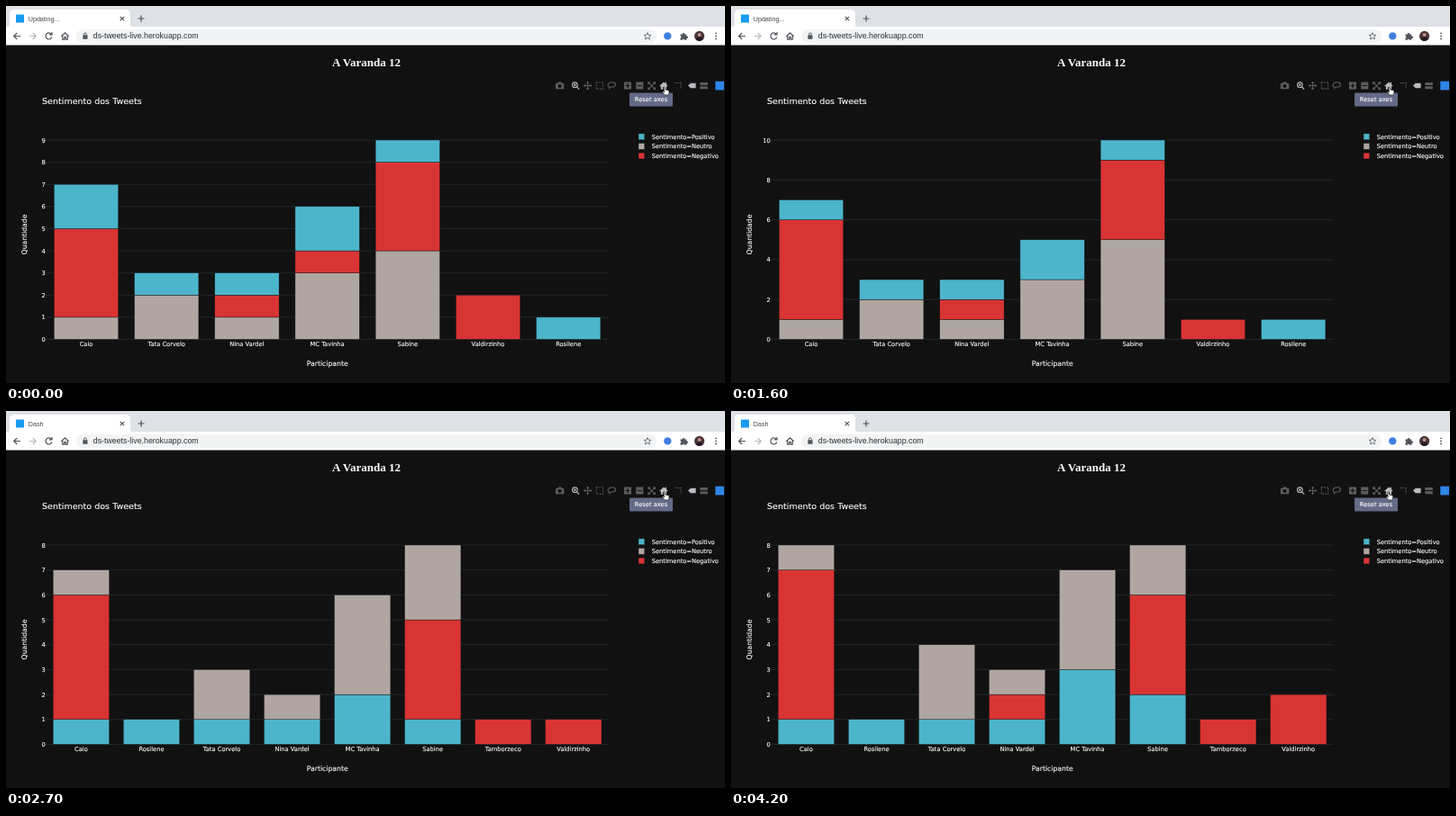
An HTML page that plays this animation: 798x419 px, repeating every 4.4 s.

```html
<!DOCTYPE html>
<html lang="pt">
<head>
<meta charset="utf-8">
<title>Dash</title>
<style>
  html, body { margin: 0; width: 100%; height: 100%; overflow: hidden; background: #111; }
  svg { display: block; width: 100%; height: 100%; }
  .ui { font-family: "Liberation Sans", Arial, sans-serif; }
  .plot { font-family: "DejaVu Sans", Verdana, sans-serif; font-size: 6.7px; fill: #fff; }
  .plot text { stroke: #fff; stroke-width: .12; }
  .head { font: bold 13px "Liberation Serif", Times, serif; fill: #fff; }
  .mid { text-anchor: middle; }
  .end { text-anchor: end; }
  .line { fill: none; stroke: #50545a; stroke-width: 1.2; }
  .tool { fill: #5c5d5f; stroke: #5c5d5f; stroke-width: 0; }
  .tool .o { fill: none; stroke-width: 1.1; }
  .tool .on { fill: #b9bbbf; stroke: #b9bbbf; }
</style>
</head>
<body>
<svg viewBox="0 0 798 419" preserveAspectRatio="none">
  <clipPath id="area"><rect x="44.4" y="137.8" width="624.4" height="233"/></clipPath>
  <rect width="798" height="419" fill="#111"/>

  <g class="ui">
    <rect width="798" height="24" fill="#dee1e6"/>
    <rect y="23" width="798" height="20.5" fill="#fff"/>
    <path d="M0 24q4 0 4-4V9q0-5 5-5h124q5 0 5 5v11q0 4 4 4z" fill="#fff"/>
    <rect x="11" y="9.5" width="9" height="9" fill="#1a9bf0"/>
    <text id="tab" x="24.7" y="16.5" font-size="7.2" fill="#45494d"></text>
    <path class="line" d="M126.7 11.8l4.4 4.4m0-4.4l-4.4 4.4M146.5 14h7m-3.5-3.5v7"/>
    <rect x="78" y="26" width="644" height="15" rx="7.5" fill="#f1f3f4"/>
    <path class="line" d="M16 33.5H8.7m3.5-3.5l-3.5 3.5 3.5 3.5"/>
    <path class="line" style="stroke:#b9bcc0" d="M26 33.5h7.3m-3.5-3.5l3.5 3.5-3.5 3.5"/>
    <path class="line" d="M50.3 31.3a3.5 3.5 0 1 0 .6 3.2M51 29v2.9h-3"/>
    <path class="line" d="M61.3 33.7l4.2-3.9 4.2 3.9M62.7 33v4.2h2v-2.7h1.6v2.7h2V33"/>
    <rect x="85.3" y="32.3" width="5.2" height="4.4" rx=".5" fill="#50545a"/>
    <path class="line" style="stroke-width:.9" d="M86.5 32.5v-1.2a1.4 1.4 0 0 1 2.8 0v1.2"/>
    <text x="96.8" y="36.3" font-size="8.8" fill="#2a2d31">ds-tweets-live.herokuapp.com</text>
    <path class="line" style="stroke-width:.8" d="M712 29.6l1.1 2.5 2.7.3-2 1.8.6 2.7-2.4-1.4-2.4 1.4.6-2.7-2-1.8 2.7-.3z"/>
    <circle cx="734.3" cy="33.4" r="4.2" fill="#3f7fe0"/>
    <path d="M748.5 31.4h2.2a1.3 1.3 0 1 1 2.6 0h2v2.2a1.3 1.3 0 1 1 0 2.5v1.6h-2.2a1.2 1.2 0 0 0-2.3 0h-2.3v-2.2a1.2 1.2 0 0 0 0-2.3z" fill="#50545a"/>
    <circle cx="769.6" cy="33.4" r="5.6" fill="#4a3538"/>
    <circle cx="769.6" cy="31.9" r="2" fill="#bd9188"/>
    <path d="M765.7 37.3q.6-3 3.9-3t3.9 3a5.6 5.6 0 0 1-7.8 0z" fill="#241c22"/>
    <g fill="#50545a"><circle cx="788" cy="30.3" r=".9"/><circle cx="788" cy="33.4" r=".9"/><circle cx="788" cy="36.5" r=".9"/></g>
  </g>

  <text class="head mid" x="400" y="67">A Varanda 12</text>

  <g class="tool">
    <path fill-rule="evenodd" d="M610 86h2l1-1.5h3.4l1 1.5h1.9v6.2H610zM614.6 86.9a2.1 2.1 0 1 0 .01 0z"/>
    <g class="on"><circle class="o" cx="631.4" cy="87.7" r="2.8"/><path class="o" d="M633.5 89.8l2.7 2.7M630 87.7h2.8m-1.4-1.4v2.8"/></g>
    <path class="o" d="M641.5 88.5h8.2m-4.1-4.1v8.2"/>
    <path d="M645.6 83.7l1.9 2h-3.8zM645.6 93.3l1.9-2h-3.8zM640.8 88.5l2-1.9v3.8zM650.4 88.5l-2-1.9v3.8z"/>
    <rect class="o" x="655.3" y="84.7" width="7.4" height="7.4" stroke-dasharray="1.6 1.2"/>
    <path class="o" d="M670 90.6c-4-2.2-1-5.9 2.8-5.9 5 0 4.8 5.3 0 5.3-3.6 0-3 1.5-2.8 2.7"/>
    <path fill-rule="evenodd" d="M686 84.5h8v8h-8zM689.4 86v1.9h-1.9v1.2h1.9V91h1.2v-1.9h1.9v-1.2h-1.9V86z"/>
    <path fill-rule="evenodd" d="M699.3 84.5h8v8h-8zM700.8 87.9v1.2h5v-1.2z"/>
    <path class="o" d="M713.4 85.4l6.4 6.4m0-6.4l-6.4 6.4M712.8 87v-2.2h2.2m3.2 0h2.2V87m0 3.2v2.2h-2.2m-3.2 0h-2.2v-2.2"/>
    <path class="on" d="M725.3 88.8l4.7-4.4 1.8 1.7v-1.3h1.2v2.4l1.7 1.6-.7.7-.9-.8v4h-2.2v-2.6h-1.8v2.6h-2.2v-4l-.9.8z"/>
    <path class="o" d="M742.8 85.5h6.3v6.8" stroke-dasharray="1.5 1"/>
    <path class="on" d="M757 88.5l2.8-2.7h5.8v5.4h-5.8z"/>
    <path d="M770.3 85h8.5v3h-8.5zM770.3 89.3h8.5v3h-8.5z"/>
    <rect x="787.3" y="83.7" width="9.7" height="9.7" fill="#2f86e8"/>
  </g>

  <g class="plot">
    <text x="40" y="109.3" font-size="9.55">Sentimento dos Tweets</text>
    <text class="mid" x="356.7" y="399.5" font-size="7.7">Participante</text>
    <text class="mid" transform="translate(23.3 254) rotate(-90)" font-size="7.7">Quantidade</text>
    <g id="legend"></g>
    <g id="axes"></g>
    <g id="bars" clip-path="url(#area)"></g>
    <rect x="692" y="96.5" width="48" height="15" rx="1" fill="#636b87"/>
    <text class="mid" x="716" y="106.3" font-size="6.7">Reset axes</text>
  </g>

  <path id="hand" d="M-1.5 .2q1.3-.8 1.5.6l.4 2.2 3.2.7q1.3.4 1.1 1.7l-.6 3.5h-4.2l-2.6-3.3q0-1 1.2-.5l.8.7z" fill="#fff" stroke="#111" stroke-width=".6"/>
</svg>

<script>
const LOOP = 4400, STEP = 100, MORPH = 300;
const LEFT = 44.4, WIDTH = 624.4, BASE = 370.5, HEIGHT = 221.5;
const NAMES = {
  C: 'Caio', R: 'Rosilene', T: 'Tata Corvelo', N: 'Nina Vardel',
  M: 'MC Tavinha', S: 'Sabine', B: 'Tamborzeco', V: 'Valdirzinho'
};
// order of the bars inside each series
const ORDER = 'CBVRTNMS';
const SERIES = [
  ['Positivo', '#4cb5cb'],
  ['Neutro', '#b0a6a1'],
  ['Negativo', '#d93434']
];

// values: positive, neutral and negative count of each participant
const state = (start, morph, max, stack, cats, values) => ({
  start, morph, max, stack, cats,
  values: values.split(' ').map(v => [...v].map(Number))
});
const STATES = [
  state(0, 0, 9, [1, 2, 0], 'CTNMSVR', '214 120 111 231 144 002 100'),
  state(150, MORPH, 10, [1, 2, 0], 'CTNMSVR', '215 120 111 231 154 001 100'),
  state(1300, MORPH, 10, [1, 2, 0], 'CTNMSVR', '115 120 111 230 154 001 100'),
  state(2200, 0, 10, [2, 1, 0], 'CVSTNMR', '115 001 154 120 110 240 100'),
  state(2350, MORPH, 8, [0, 2, 1], 'CRTNMSBV', '115 100 120 110 240 134 001 001'),
  state(2950, MORPH, 8, [0, 2, 1], 'CRTNMSBV', '114 100 120 110 240 134 001 002'),
  state(3550, MORPH, 8, [0, 2, 1], 'CRTNMSBV', '114 100 130 111 240 134 001 002'),
  state(3850, MORPH, 8, [0, 2, 1], 'CRTNMSBV', '116 100 130 111 340 224 001 002')
];

const $ = id => document.getElementById(id);
const mix = (a, b, p) => a + (b - a) * p;
const ease = p => p < .5 ? 4 * p ** 3 : 1 - 4 * (1 - p) ** 3;
const rect = (x, y, w, h, fill) =>
  `<rect x="${x}" y="${y}" width="${w}" height="${h}" fill="${fill}" stroke="#111" stroke-width=".4"/>`;
const text = (x, y, cls, str) => `<text x="${x}" y="${y}" class="${cls}">${str}</text>`;

$('legend').innerHTML = SERIES.map(([name, color], i) => {
  const y = 145.3 + i * 10.6;
  return rect(702, y - 3.4, 6.8, 6.8, color) + text(716.7, y + 2.4, '', 'Sentimento=' + name);
}).join('');

// one list of [x, y, width, height] per series, measured on the given axes
function layout({ stack, cats, values }, axes) {
  const slot = WIDTH / axes.cats.length, unit = HEIGHT / axes.max;
  const tops = values.map(() => BASE);
  return stack.map(k => {
    const boxes = {};
    [...cats].forEach((key, c) => {
      const h = values[c][k] * unit;
      if (h) boxes[key] = [LEFT + slot * (c + .1), tops[c] -= h, slot * .8, h];
    });
    return [...ORDER].filter(key => boxes[key]).map(key => boxes[key]);
  });
}

// bars morph by their index in the series; the axes follow when the morph is over
function chart(t) {
  const i = STATES.findLastIndex(s => s.start <= t);
  const to = STATES[i], from = STATES[i - 1] || to;
  const p = to.morph ? Math.min(1, (t - to.start) / to.morph) : 1;
  const axes = p < 1 ? from : to;
  const old = layout(from, axes);
  const bars = layout(to, axes).map((list, s) => list.map((box, n) => {
    const a = old[s][n] || box;
    return rect(...box.map((v, d) => mix(a[d], v, ease(p))), SERIES[to.stack[s]][1]);
  }).join(''));
  $('axes').innerHTML = drawAxes(axes);
  $('bars').innerHTML = bars.join('');
}

function drawAxes({ max, cats }) {
  const slot = WIDTH / cats.length, tick = max < 10 ? 1 : 2;
  let out = '';
  for (let v = 0; v <= max; v += tick) {
    const y = BASE - v * HEIGHT / max;
    out += `<path d="M${LEFT} ${y}h${WIDTH}" stroke="#222c33" stroke-width=".8"/>`;
    out += text(43.8, y + 2.5, 'end', v);
  }
  [...cats].forEach((key, c) => { out += text(LEFT + slot * (c + .5), 378, 'mid', NAMES[key]); });
  return out;
}

function draw(t) {
  const idle = t >= 2000 || (t >= 900 && t < 1000);
  const pressed = (t >= 2000 && t < 2400) || t >= 4200;
  $('tab').textContent = idle ? 'Dash' : 'Updating...';
  $('hand').setAttribute('transform', `translate(${pressed ? 730 : 731.3} 90)`);
  chart(t);
}

const begin = performance.now();
let shown = -1;
function tick() {
  const t = Math.floor((performance.now() - begin) % LOOP / STEP) * STEP;
  if (t !== shown) draw(shown = t);
  requestAnimationFrame(tick);
}
tick();
</script>
</body>
</html>
```
